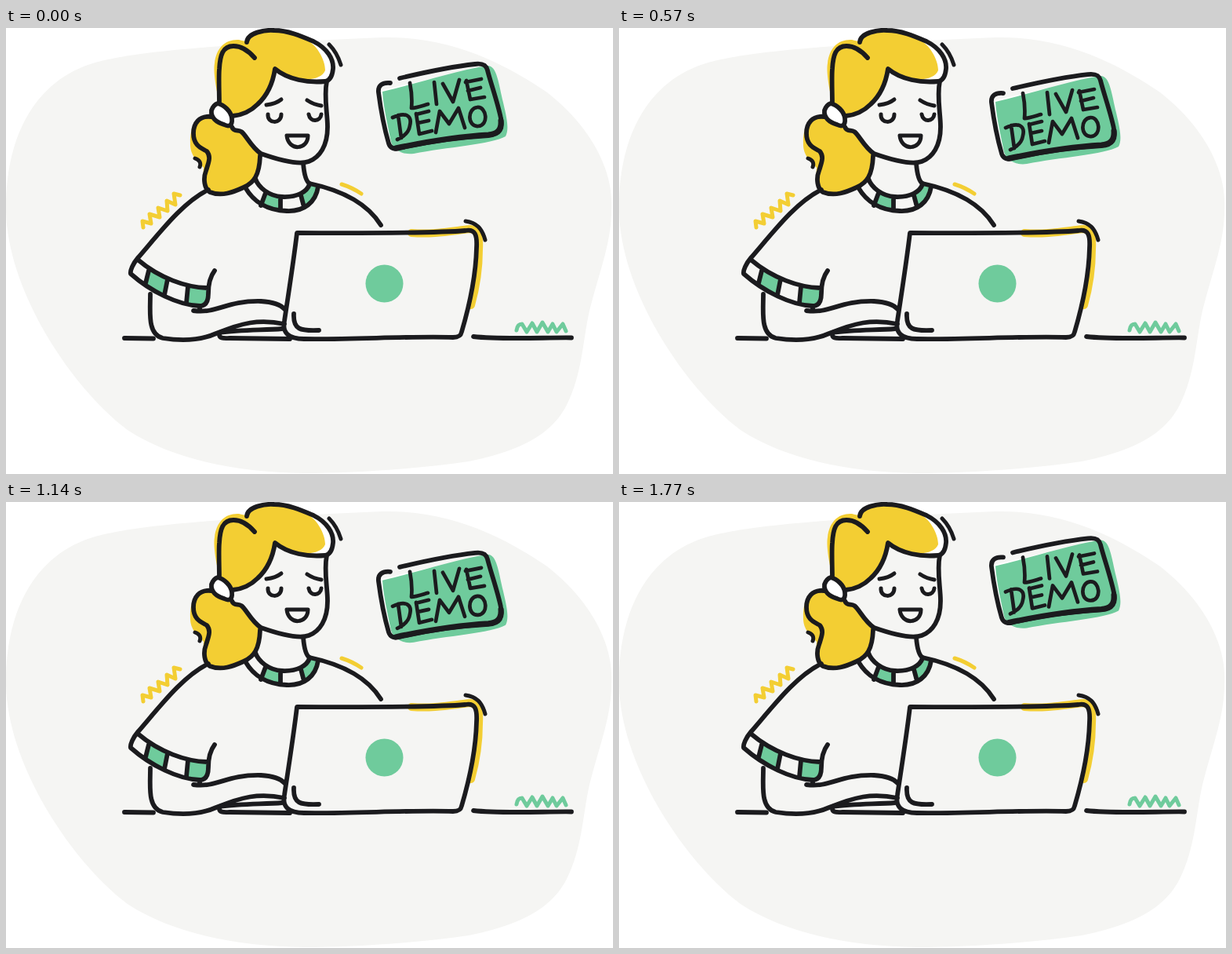
An HTML page for the animation above (1.8 s loop, 774x568 px).

```html
<!DOCTYPE html>
<html lang="en">
<head>
<meta charset="utf-8">
<title>Live demo</title>
<style>
  html, body { margin: 0; width: 100%; height: 100%; overflow: hidden; background: #fff; }
  svg { display: block; width: 774px; height: 568px; }
  path { stroke-linecap: round; stroke-linejoin: round; }
  .ink { fill: none; stroke: #1b1b1e; stroke-width: 5.8; }
  .thin { stroke-width: 5; }
  .pale { fill: #f5f5f3; }
  .yellow { fill: #f3ce33; }
  .green { fill: #6fcb9c; }
  .yellow-line { fill: none; stroke: #f3ce33; stroke-width: 5; }
  .green-line { fill: none; stroke: #6fcb9c; stroke-width: 5; }
</style>
</head>
<body>
<svg viewBox="0 0 774 568">
  <path class="pale" d="M0 230C0 126 46 56 130 40C190 27 300 20 480 12C570 10 640 48 690 82C745 125 775 180 772 232C772 275 755 315 744 360C735 400 735 440 715 480C695 520 650 540 590 552C520 562 440 567 380 567C290 566 210 548 155 512C80 455 0 330 0 230Z"/>

  <!-- hair -->
  <path fill="#fff" d="M307 18C308 6 330 2 342 3C360 3 378 11 392 17C410 26 418 40 417 52C416 62 413 67 407 68C385 70 360 66 343 52Z"/>
  <path class="yellow" d="M273 97C268 80 264 55 266 45C268 25 280 14 297 15C305 17 306 18 309 14C315 0 355 2 380 13C396 20 407 40 407 54C402 68 370 71 343 52C340 78 320 106 289 112C285 102 280 97 273 97Z"/>
  <path class="yellow" d="M262 113C242 112 234 125 235 150C236 165 247 172 252 178C251 192 252 204 260 209C275 215 290 209 303 203C315 196 321 185 324 162C310 152 304 134 298 132C292 131 288 128 286 124Z"/>
  <path class="ink" d="M272 97C272 85 271 62 272 52C273 35 276 23 290 23C302 23 311 31 317 38
    M307 18C308 6 330 2 342 3C360 3 378 11 392 17C410 26 418 40 417 52C416 62 413 67 407 68C385 70 360 66 343 52C340 72 333 86 321 97C311 107 300 111 289 112
    M262 113C246 111 239 122 239 134C239 150 249 153 256 157C262 164 258 172 255 182C251 192 253 205 260 209C275 215 290 209 303 203C316 197 323 188 324 163"/>
  <path class="ink" style="fill:#fff" d="M270 96C278 98 287 106 288 115C289 125 284 126 278 123C268 120 261 114 262 105C264 99 267 97 270 96Z"/>
  <path class="ink thin" d="M412 21C419 28 424 37 427 47M241 166C247 168 249 172 247 177"/>

  <!-- face -->
  <path class="ink" d="M409 68C405 88 410 108 410 126C410 150 400 165 386 170C372 175 345 167 325 160C312 151 306 136 300 132C296 129 291 133 288 126
    M379 172C380 185 382 195 387 198"/>
  <path class="ink thin" d="M332 98C340 97 346 95 351 91M384 92C390 96 396 98 402 99M334 110C333 122 351 123 351 110M386 110C388 121 401 119 402 110M358 137L385 137C385 156 360 157 358 137Z"/>

  <!-- collar -->
  <path class="green" d="M331 209L325 226L350 232V215ZM387 199L376 213L380 229C392 222 397 214 398 202Z"/>
  <path class="ink" d="M305 203C315 220 330 232 358 233C380 234 395 222 398 202M318 192C322 203 335 214 352 215C372 216 384 208 387 199
    M331 210L325 226M350 216V231M376 213L380 228
    M387 198C425 206 460 222 478 251"/>
  <path class="yellow-line" d="M428 199Q441 203 453 211"/>

  <!-- sleeve and arm -->
  <path class="green" d="M182 309L178 326L202 340L206 320ZM232 329L230 351L247 354C256 354 258 345 261 330Z"/>
  <path class="ink" d="M258 206C225 222 195 262 168 293C162 300 158 309 159 313C185 336 220 353 247 354C256 354 258 346 258 338C258 328 260 317 266 309
    M168 295C195 318 230 331 258 331M182 309L178 325M206 320L202 340M232 329L230 350
    M184 339C184 362 180 390 200 395C225 399 250 397 268 389C300 376 322 370 355 377
    M247 355V360M239 360C270 364 280 347 325 348C340 349 350 352 355 358
    M272 388C300 384 330 385 352 383M272 390C272 396 278 395 285 395L362 396"/>
  <path class="yellow-line" d="M175 254L174 246L185 249L183 237L196 241L194 229L206 233L205 220L216 225L214 211L222 213"/>

  <!-- laptop and desk -->
  <path class="yellow-line" style="stroke-width:10" d="M517 261C545 263 565 259 592 256C602 257 604 265 603 282C603 310 598 335 593 353"/>
  <path class="ink" d="M371 261C430 261 540 262 586 258C598 256 601 263 600 280C599 320 589 360 581 387C580 392 577 394 570 394C520 392 440 397 380 396C360 396 352 388 355 373C360 340 367 295 371 261Z
    M367 364C366 384 375 386 399 385M151 395L188 395.500M596 393C630 397 690 394 721 394.500"/>
  <path class="ink thin" d="M586 246C600 248 607 255 611 270"/>
  <circle class="green" cx="482.500" cy="325.500" r="24"/>
  <path class="green-line" d="M651 385C652 378 655 377 658 377L664 387L671 376L677 387L684 375L691 387L697 377L702 387L710 377L714 386"/>

  <g id="sign" role="img" aria-label="LIVE DEMO">
    <path fill="#fff" d="M476 80L612 48L631 130L492 152Z"/>
    <path class="green" d="M480 81C520 72 570 55 614 48C626 48 628 70 634 95C640 120 641 130 637 138C620 148 560 152 520 160C505 162 494 155 491 145C487 125 481 100 480 81Z"/>
    <path class="ink" d="M490 70C480 69 474 73 475 82C478 105 483 130 488 147C490 153 495 155 502 153C540 144 580 139 615 137C630 136 634 128 631 115C627 95 618 70 614 54C612 46 606 45 598 46C570 49 540 55 502 64"/>
    <path class="ink" style="stroke-width:7" d="M497 153C540 144 580 138 615 136C626 135 632 130 631 118"/>
    <path class="ink" style="stroke-width:4.700" d="M515 70C517 80 518 92 517 102C523 102 531 99 538 97
      M546 69L549 97M557 71L570 94L578 66
      M587 67L592 91M586 69L606 65M589 80L605 76M592 91L610 88
      M500 111L504 140M493 114C510 106 518 112 515 124C514 132 508 138 499 142
      M523 109L527 135M523 110L539 106M525 121L539 118M527 135L543 131
      M548 133L553 106L565 122L577 102L585 127
      M601 101C613 100 616 124 602 125C588 126 588 102 601 101Z"/>
  </g>
</svg>
<script>
  const LOOP = 1800, STEP = 30, TURN = 1000, DROP = 21.6;
  const sign = document.getElementById("sign");
  const smooth = u => u * u * (3 - 2 * u);

  // The sign sinks gently, then rises at a more even pace.
  function offset(t) {
    if (t < TURN) return DROP * smooth(t / TURN);
    const u = (t - TURN) / (LOOP - TURN);
    return DROP * (1 - (u + smooth(u)) / 2);
  }

  function draw() {
    const t = Math.floor(performance.now() % LOOP / STEP) * STEP;
    sign.setAttribute("transform", `translate(0 ${offset(t).toFixed(2)})`);
    requestAnimationFrame(draw);
  }
  draw();
</script>
</body>
</html>
```
